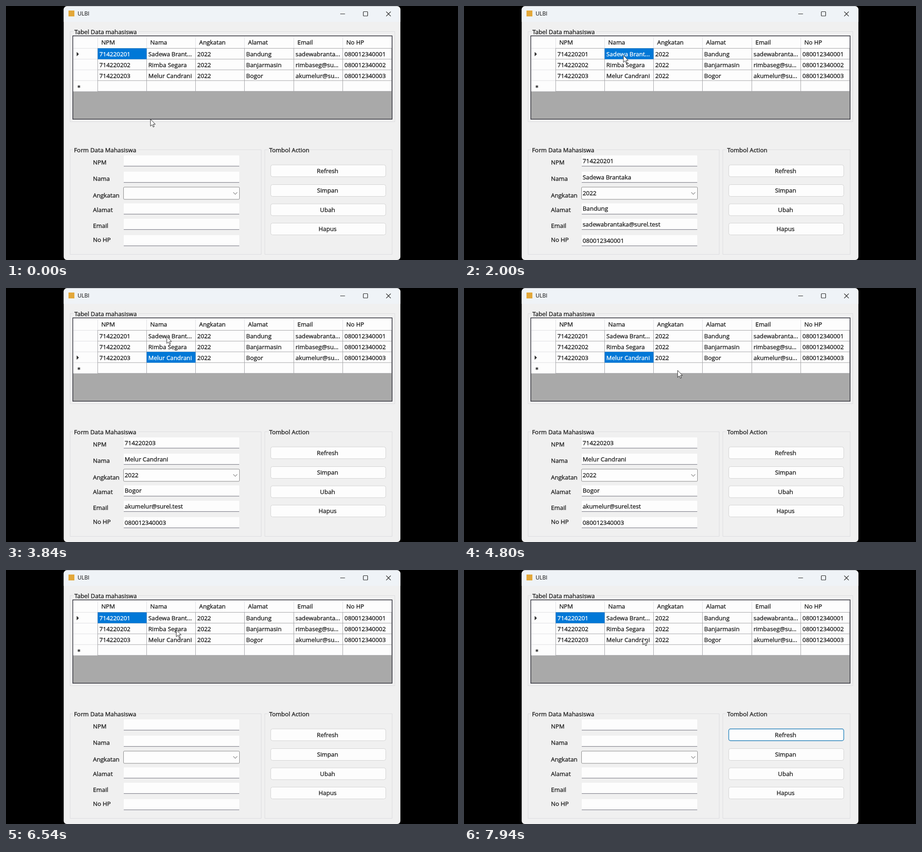
An HTML page for the animation above (8 s loop, 998 by 561 pixels).

```html
<!DOCTYPE html>
<html lang="id">
<head>
<meta charset="utf-8">
<title>ULBI</title>
<style>
  html, body { margin: 0; width: 100%; height: 100%; overflow: hidden; background: #000; }
  svg { display: block; width: 100vw; height: 100vh; }
  text {
    font: 13.3px "Open Sans", "Noto Sans", sans-serif; white-space: pre;
    color: #1c1c1c; fill: currentColor; stroke: currentColor; stroke-width: .35px;
  }
</style>
</head>
<body>
<svg id="stage" viewBox="0 0 998 561"></svg>
<script>
const LOOP = 8000;
const stage = document.getElementById('stage');

const heads = ['NPM', 'Nama', 'Angkatan', 'Alamat', 'Email', 'No HP'];
const people = [
  ['714220201', 'Sadewa Brantaka', '2022', 'Bandung', 'sadewabrantaka@surel.test', '080012340001'],
  ['714220202', 'Rimba Segara', '2022', 'Banjarmasin', 'rimbaseg@surel.test', '080012340002'],
  ['714220203', 'Melur Candrani', '2022', 'Bogor', 'akumelur@surel.test', '080012340003']
];
const clipped = {
  'Sadewa Brantaka': 'Sadewa Brant...',
  'sadewabrantaka@surel.test': 'sadewabranta...',
  'rimbaseg@surel.test': 'rimbaseg@su...',
  'akumelur@surel.test': 'akumelur@su...'
};

const colX = [202.5, 310.5, 418.5, 526.5, 635.5, 743.5, 851.5];
const rowY = [93.5, 117.3, 141, 164.8, 188.4];
const labelY = [349.5, 386, 422.5, 455, 489.5, 521];
const boxY = [330, 366, 400, 436, 470, 506];
const valueY = [346.5, 383, 417.5, 452, 486.5, 523];

const rect = (x, y, w, h, fill, more = '') =>
  `<rect x="${x}" y="${y}" width="${w}" height="${h}" fill="${fill}" ${more}/>`;
const path = (d, stroke, more = '') => `<path d="${d}" fill="none" stroke="${stroke}" ${more}/>`;
const text = (x, y, s, more = '') => `<text x="${x}" y="${y}" ${more}>${s}</text>`;

function group(x, y, w, h, title, tx, gap) {
  return rect(x, y, w, h, 'none', 'stroke="#dcdcdf"') +
    rect(tx - 3, y - 2, gap, 4, '#f0f0f0') + text(tx, y + 5, title);
}

function windowFrame() {
  return rect(127.4, 0.6, 743.4, 560.4, '#f0f0f0', 'rx="7"') +
    '<path d="M127.4 35V7.6a7 7 0 0 1 7-7H863.8a7 7 0 0 1 7 7V35Z" fill="#eff3f7"/>' +
    rect(138, 10, 13, 13, '#e3a83a') +
    text(158, 21.3, 'ULBI', 'style="font-size:12px;stroke-width:.1px"') +
    path('M738 17.5H748.5M839.5 12.5L849.5 22.5M849.5 12.5L839.5 22.5', '#222', 'stroke-width="1.1"') +
    rect(789, 12.5, 9.5, 9.5, 'none', 'stroke="#222" stroke-width="1.2" rx="1"');
}

function table() {
  let s = rect(147.5, 66, 705, 184, '#a9a9a9') + rect(148, 66.5, 704, 122, '#fdfdfd');
  s += path(colX.map(x => `M${x} 68V93`).join('') +
    rowY.map(y => `M149 ${y}H202`).join(''), '#dedee2');
  s += path(colX.map(x => `M${x} 93V189`).join('') +
    rowY.map(y => `M202 ${y}H852`).join(''), '#a3a3a6');
  s += rect(0, 0, 108, 24, '#0078d7', 'id="pick"');
  s += rect(147.5, 66, 705, 184, 'none', 'stroke="#24242e" stroke-width="1.4"');
  heads.forEach((h, c) => s += text(colX[c] + 8, 85.3, h));
  people.forEach((p, r) => p.forEach((v, c) =>
    s += text(colX[c] + 3.8, rowY[r] + 17.7, clipped[v] || v, `id="c${r}${c}"`)));
  s += '<path id="marker" d="M156 -4.8L161 0L156 4.8Z" fill="#333"/>';
  s += path('M161 174.8V181.2M158.2 176.4L163.8 179.6M163.8 176.4L158.2 179.6', '#333', 'stroke-width="1.3"');
  return s;
}

function form() {
  let s = '';
  heads.forEach((h, i) => {
    const y = boxY[i];
    s += text(192, labelY[i], h);
    if (i === 2) {
      s += rect(259.5, y, 256, 27, '#fdfdfd', 'rx="2" stroke="#858585"') +
        path('M501.8 411.5L506.2 416L510.6 411.5', '#8a8a8a', 'stroke-width="1.1"');
    } else {
      s += rect(260, y, 255, 24, '#fdfdfd', 'rx="1"') + path(`M260 ${y + 23.6}H515`, '#85858f', 'stroke-width="1.2"');
    }
    s += text(262, valueY[i], '', `id="v${i}"`);
  });
  return s;
}

function buttons() {
  return ['Refresh', 'Simpan', 'Ubah', 'Hapus'].map((name, i) => {
    const y = [351, 394.5, 437, 479.5][i];
    const box = (fill, more) => rect(584.5, y, 254, 26, fill, 'rx="4" ' + more);
    return box('#fdfdfd', 'stroke="#d2d2d2"') +
      (i ? '' : box('#dcebf4', 'id="hover"') + box('none', 'id="focus" stroke="#2b87c0" stroke-width="1.5"')) +
      text(710, y + 17.8, name, 'text-anchor="middle"');
  }).join('');
}

stage.innerHTML = windowFrame() +
  group(141.5, 56.5, 717, 199, 'Tabel Data mahasiswa', 151, 145) +
  group(141.5, 317.5, 422, 231, 'Form Data Mahasiswa', 150, 145) +
  group(571.5, 317.5, 281, 231, 'Tombol Action', 581, 92) +
  table() + form() + buttons() +
  '<path id="cursor" d="M0 0V15.4L3.6 12.1L6 17.4L8.3 16.4L6 11.2H10.6Z" fill="#fff" stroke="#222" stroke-width="1"/>';

const el = id => document.getElementById(id);

// Pointer stops: time, x, y
const stops = [
  [0, 319, 250], [100, 319, 250], [850, 278, 229], [940, 278, 229],
  [1650, 352, 109], [2050, 352, 109], [2450, 353, 131], [2700, 353, 131],
  [3080, 355, 153], [3350, 355, 153], [3750, 355, 107], [4570, 355, 107],
  [5200, 738, 353], [5680, 738, 353], [6500, 376, 132], [6700, 376, 132],
  [7870, 394, 149], [7940, 395, 150], [LOOP, 395, 150]
];
// Selection: time, row, column, form filled
const picks = [
  [0, 0, 0, false], [1740, 0, 1, true], [2540, 1, 1, true], [3200, 2, 1, true], [5340, 0, 0, false]
];

const clamp = v => Math.max(0, Math.min(1, v));
const ramp = (t, a, b) => { const k = clamp((t - a) / (b - a)); return k * k * (3 - 2 * k); };

function pointer(t) {
  const i = Math.max(1, stops.findIndex(s => s[0] > t));
  const [a, b] = [stops[i - 1], stops[i]];
  const k = ramp(t, a[0], b[0]);
  return [a[1] + (b[1] - a[1]) * k, a[2] + (b[2] - a[2]) * k];
}

let shown = null;
function select(pick) {
  if (pick === shown) return;
  shown = pick;
  const [, row, col, filled] = pick;
  el('pick').setAttribute('x', colX[col]);
  el('pick').setAttribute('y', rowY[row]);
  el('marker').setAttribute('transform', `translate(0 ${rowY[row] + 12.8})`);
  people.forEach((p, r) => p.forEach((v, c) =>
    el(`c${r}${c}`).style.color = r === row && c === col ? '#fff' : ''));
  heads.forEach((h, i) => el(`v${i}`).textContent = filled ? people[row][i] : '');
}

function draw(t) {
  const [x, y] = pointer(t);
  el('cursor').setAttribute('transform', `translate(${x.toFixed(2)} ${y.toFixed(2)})`);
  select(picks.filter(p => p[0] <= t).pop());
  const over = x > 584 && x < 839 && y > 351 && y < 377;
  const glow = t < 5340 ? 0 : 1 - ramp(t, 5900, 6400) + ramp(t, 6950, 7450);
  el('hover').setAttribute('opacity', over ? 1 : 0);
  el('focus').setAttribute('opacity', over ? 1 : glow);
}

const start = performance.now();
function tick() {
  draw((performance.now() - start) % LOOP);
  requestAnimationFrame(tick);
}
tick();
</script>
</body>
</html>
```
